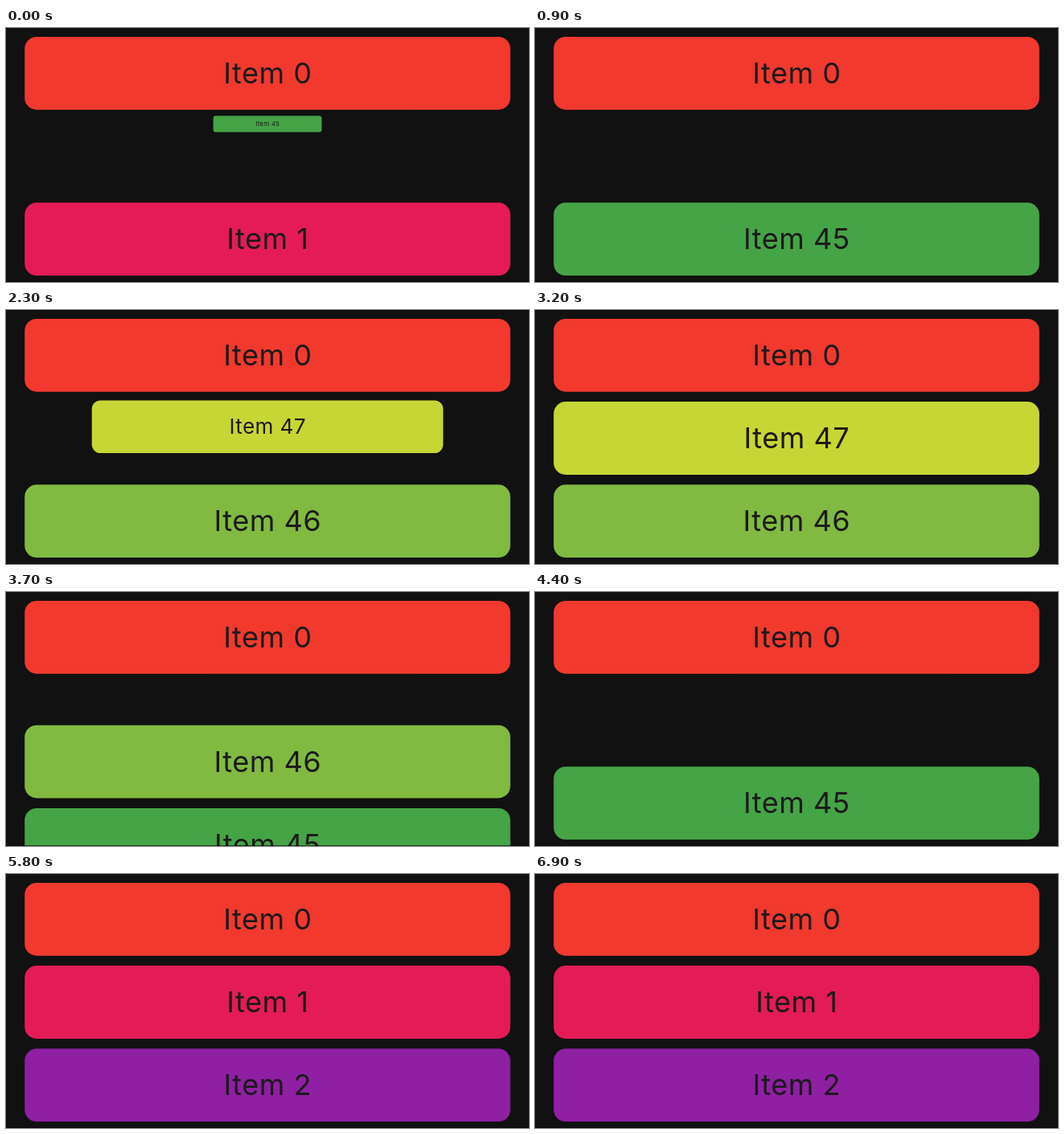
An HTML page that plays this animation: 650 px wide and 316 px high, repeating every 7400 ms.

```html
<!DOCTYPE html>
<html lang="en">
<head>
<meta charset="utf-8">
<title>Animated list</title>
<style>
  html, body { margin: 0; width: 100%; height: 100%; overflow: hidden; background: #111; }
  svg { display: block; width: 100vw; height: 100vh; }
  text {
    font: 400 36px Inter, Roboto, sans-serif;
    letter-spacing: .55px;
    text-anchor: middle;
    fill: #1c1a1b;
  }
</style>
</head>
<body>
<svg id="stage" viewBox="0 0 650 316"></svg>
<script>
const NS = 'http://www.w3.org/2000/svg';
const LOOP = 7400, STEP = 100, LAST = 6900;
const PHASE = 300; // opening the gap and scaling the card each take this long
const TOP = 4.7, CELL = 103.2, PAD = 6.2, WIDTH = 603.6, MID = 325;

// enter: the gap opens, then the card grows; leave: the card shrinks, then the gap closes
const items = [
  { n: 0, color: '#f1392e' },
  { n: 47, color: '#c6d634', enter: 1783, leave: 3250 },
  { n: 46, color: '#80ba40', enter: 600, leave: 4100 },
  { n: 45, color: '#45a445', enter: -367, leave: 4950 },
  { n: 1, color: '#e41b57' },
  { n: 2, color: '#8f1fa3' }
];

const stage = document.getElementById('stage');

function add(parent, tag, attrs) {
  const el = document.createElementNS(NS, tag);
  for (const key in attrs) el.setAttribute(key, attrs[key]);
  return parent.appendChild(el);
}

add(stage, 'rect', { width: 650, height: 316, fill: '#111' });
for (const item of items) {
  item.el = add(stage, 'g', {});
  add(item.el, 'rect', {
    x: -WIDTH / 2, y: PAD, width: WIDTH, height: CELL - 2 * PAD, rx: 15, fill: item.color
  });
  add(item.el, 'text', { x: 0.3, y: 64.4 }).textContent = 'Item ' + item.n;
}
add(stage, 'rect', { y: 315, width: 650, height: 1, fill: '#000', opacity: 0.6 });

const ramp = (t, start) => Math.min(1, Math.max(0, (t - start) / PHASE));

function pose({ enter, leave }, t) {
  if (enter === undefined) return { size: 1, scale: 1 };
  return {
    size: ramp(t, enter) - ramp(t, leave + PHASE),
    scale: ramp(t, enter + PHASE) - ramp(t, leave)
  };
}

function draw(t) {
  let y = TOP;
  for (const item of items) {
    const { size, scale } = pose(item, t);
    item.el.setAttribute('display', scale > 0.001 ? 'inline' : 'none');
    item.el.setAttribute('transform', `translate(${MID} ${y}) scale(${scale})`);
    y += CELL * size;
  }
}

const begin = performance.now();

function tick() {
  const t = (performance.now() - begin) % LOOP;
  draw(Math.min(LAST, Math.floor(t / STEP) * STEP));
  requestAnimationFrame(tick);
}

tick();
</script>
</body>
</html>
```
